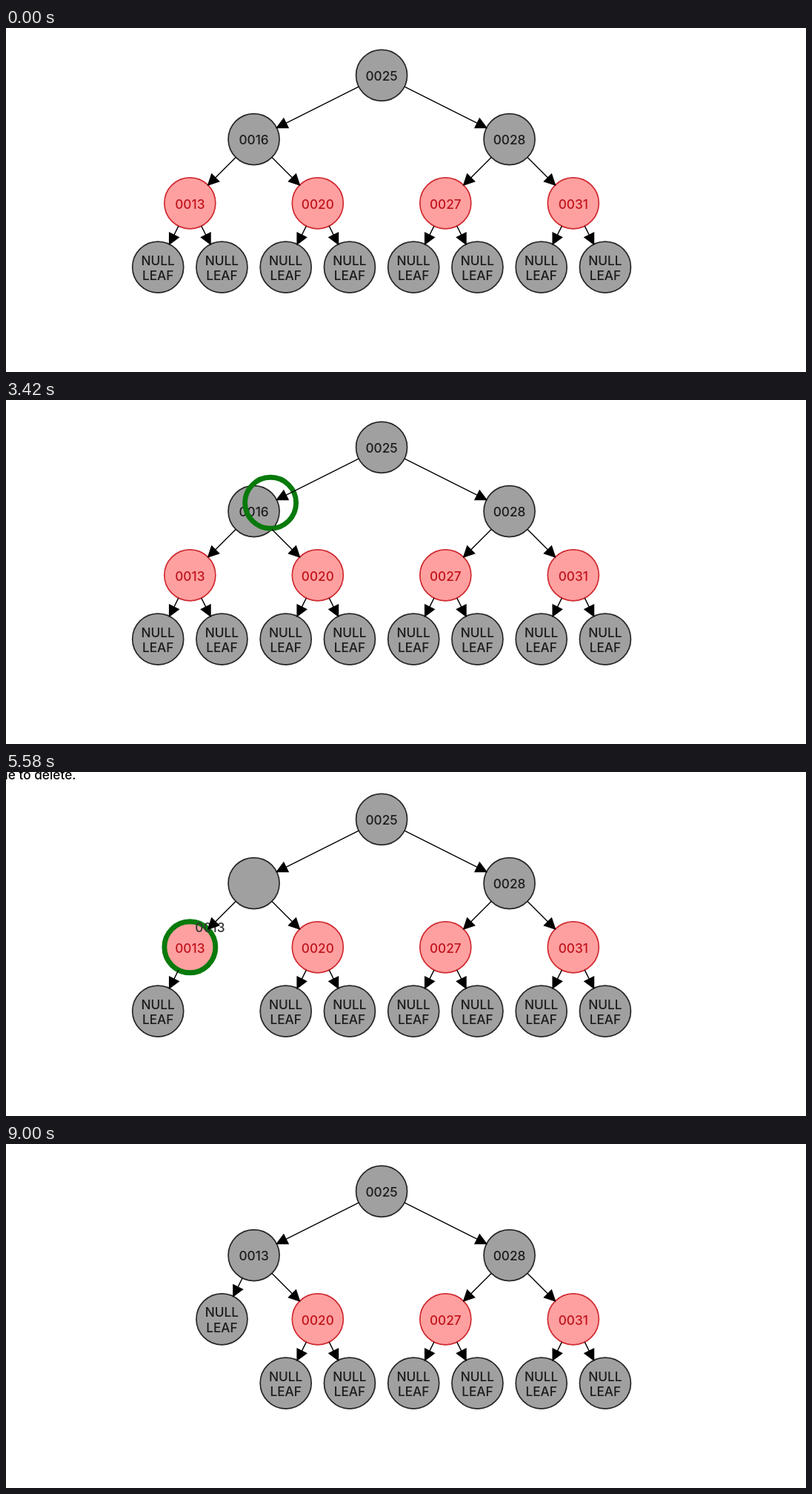
Write an HTML page with a canvas that moves like this. It is 1080 px wide and 464 px high and loops after 9.06 s.

```html
<!DOCTYPE html>
<html lang="en">
<head>
<meta charset="utf-8">
<title>Red-black tree: delete</title>
<style>
html, body { margin: 0; width: 100%; height: 100%; overflow: hidden; background: #fff; }
canvas { display: block; }
</style>
</head>
<body>
<canvas id="stage" width="1080" height="464"></canvas>
<script>
const ctx = document.getElementById('stage').getContext('2d');

const LOOP = 9060, STEP = 60;
const START = 1768, BLOCK = 883.7;          // first highlight, length of one action
const PULSE = 1643, PULSE_MIN = 1890;       // period and low point of the red ring
const UNIT = 86.25, R = 34.5;
const X0 = 205.2, Y0 = 63.8;

const GRAY = { fill: '#a0a0a0', line: '#262626', text: '#1c1c1c' };
const RED = { fill: '#ffa0a0', line: '#d02a30', text: '#c0141c' };
const COPY = 'Copy largest value of left subtree into node to delete.';
const DONE = 'Deleted node was red.  No tree rotations required.';

const at = (col, row) => ({ x: X0 + col * UNIT, y: Y0 + row * UNIT });
const root = at(3.5, 0), left = at(1.5, 1), right = at(5.5, 1);
const kids = [0.5, 2.5, 4.5, 6.5].map(c => at(c, 2));
const leaves = Array.from({ length: 8 }, (_, i) => at(i, 3));
const leafHome = at(1, 2);

const clamp = v => Math.max(0, Math.min(1, v));
const mix = (a, b, p) => ({ x: a.x + (b.x - a.x) * p, y: a.y + (b.y - a.y) * p });

function disc(p, r, fill, line) {
  ctx.beginPath();
  ctx.arc(p.x, p.y, r, 0, Math.PI * 2);
  ctx.fillStyle = fill;
  ctx.fill();
  if (line) {
    ctx.strokeStyle = line;
    ctx.lineWidth = 1.7;
    ctx.stroke();
  }
}

function write(str, x, y, color, align = 'center') {
  ctx.textAlign = align;
  ctx.fillStyle = color;
  ctx.fillText(str, x, y);
}

function node(p, str, style) {
  disc(p, R, style.fill, style.line);
  write(str, p.x, p.y + 7.3, style.text);
}

function leaf(p) {
  disc(p, R, GRAY.fill, GRAY.line);
  write('NULL', p.x, p.y - 3, GRAY.text);
  write('LEAF', p.x, p.y + 17.7, GRAY.text);
}

function greenRing(p) {
  ctx.beginPath();
  ctx.arc(p.x, p.y, R, 0, Math.PI * 2);
  ctx.strokeStyle = '#087a0c';
  ctx.lineWidth = 6.9;
  ctx.stroke();
}

function edge(a, b) {
  const d = Math.hypot(b.x - a.x, b.y - a.y);
  const ux = (b.x - a.x) / d, uy = (b.y - a.y) / d;
  const tx = b.x - ux * R, ty = b.y - uy * R;
  const bx = tx - ux * 14, by = ty - uy * 14;
  ctx.strokeStyle = ctx.fillStyle = '#000';
  ctx.lineWidth = 1.4;
  ctx.beginPath();
  ctx.moveTo(a.x + ux * R, a.y + uy * R);
  ctx.lineTo(bx, by);
  ctx.stroke();
  ctx.beginPath();
  ctx.moveTo(tx, ty);
  ctx.lineTo(bx - uy * 7, by + ux * 7);
  ctx.lineTo(bx + uy * 7, by - ux * 7);
  ctx.closePath();
  ctx.fill();
  ctx.stroke();
}

function pulseRadius(t) {
  const phase = (((t - PULSE_MIN) / PULSE) % 1 + 1) % 1;
  const swing = 1 - Math.abs(phase * 2 - 1);
  return R + 1.725 * (3 + 4 * swing);
}

function draw(t) {
  // Actions: 0 root, 1 descend, 2 found, 3 predecessor, 4 copy, 5 relink, 6 lift leaf, 7 report
  const pos = (t - START) / BLOCK;
  const act = Math.floor(pos);
  const p = pos - act;
  const movingLeaf = mix(leaves[0], leafHome, clamp(pos - 6));

  ctx.fillStyle = '#fff';
  ctx.fillRect(0, 0, 1080, 464);
  ctx.font = '500 17.25px Inter, "Liberation Sans", sans-serif';

  if (act === 4 || act === 7) {
    const x = 94.5 - ctx.measureText(COPY).width;
    write(act === 4 ? COPY : DONE, x, 10, '#000', 'left');
  }

  if (act === 0) disc(root, pulseRadius(t), '#ff2108');
  if (act === 2) disc(left, pulseRadius(t), '#ff2108');

  node(root, '0025', GRAY);
  node(left, act < 4 ? '0016' : act === 4 ? '' : '0013', GRAY);
  node(right, '0028', GRAY);
  if (act < 6) node(kids[0], '0013', RED);
  ['0020', '0027', '0031'].forEach((s, i) => node(kids[i + 1], s, RED));
  leaf(movingLeaf);
  leaves.forEach((l, i) => { if (i > 1 || (i === 1 && act < 4)) leaf(l); });

  if (act === 1) greenRing(mix(root, left, p));
  if (act === 3) greenRing(mix(left, kids[0], p));
  if (act === 4) {
    greenRing(kids[0]);
    const tag = mix(kids[0], left, p);
    write('0013', tag.x, tag.y + 6.3, '#333');
  }

  edge(root, left);
  edge(root, right);
  edge(left, act < 5 ? kids[0] : movingLeaf);
  edge(left, kids[1]);
  edge(right, kids[2]);
  edge(right, kids[3]);
  if (act < 6) edge(kids[0], leaves[0]);
  if (act < 4) edge(kids[0], leaves[1]);
  for (let i = 2; i < 8; i++) edge(kids[i >> 1], leaves[i]);
}

const begin = performance.now();
function tick() {
  const t = (performance.now() - begin) % LOOP;
  draw(Math.floor(t / STEP) * STEP);
  requestAnimationFrame(tick);
}
tick();
</script>
</body>
</html>
```
